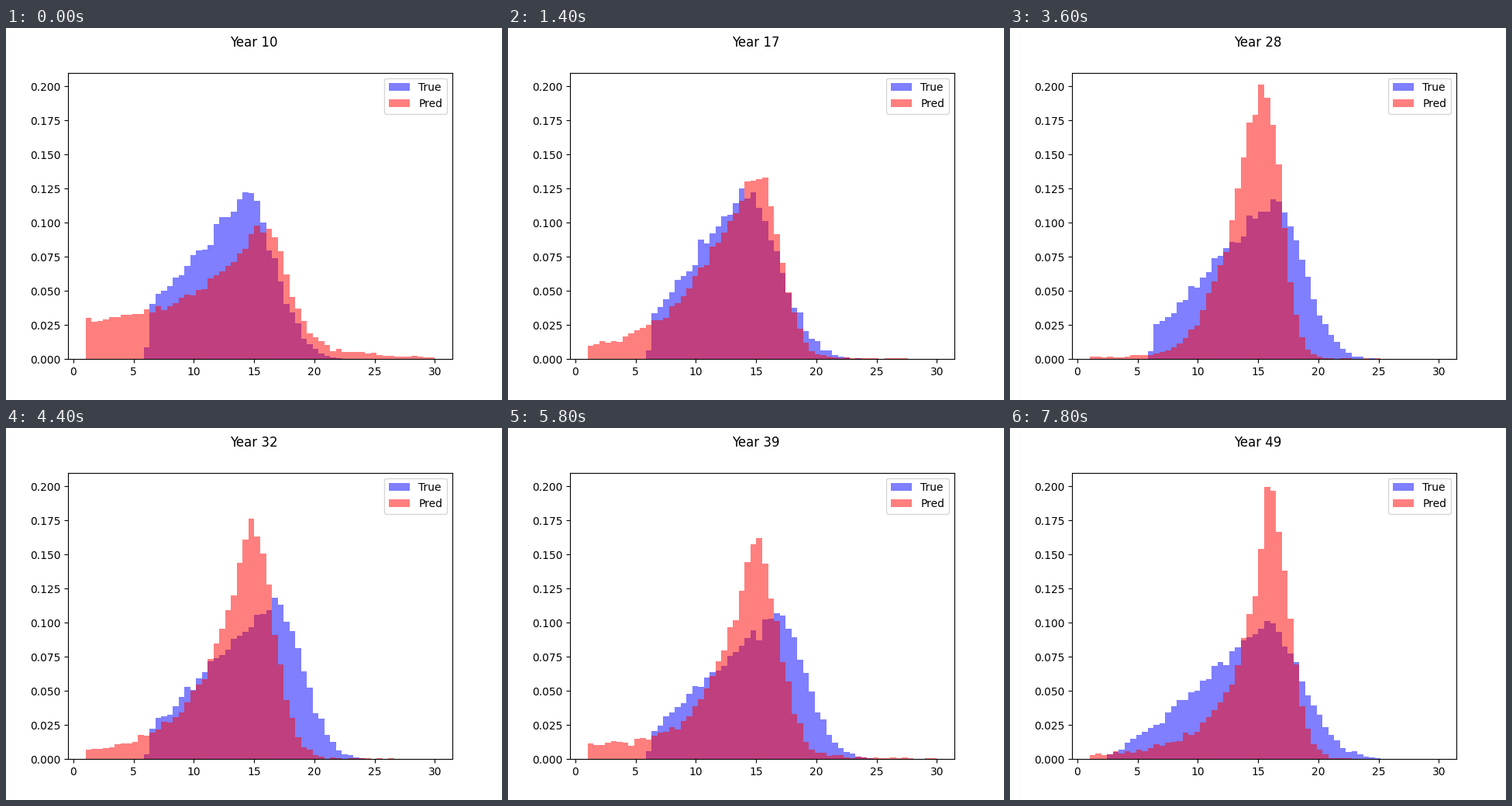
A matplotlib script that plays this animation: 640 px wide and 480 px high, repeating every 8000 ms.

```python
import matplotlib.pyplot as plt
import numpy as np
from matplotlib.animation import FuncAnimation

BINS = 60
EDGES = np.linspace(1, 30, BINS + 1)
X = (EDGES[:-1] + EDGES[1:]) / 2
FIRST_YEAR, LAST_YEAR = 10, 49
YEARS = [10, 17, 22, 28, 32, 39, 49]
RAMP_START = 6.5

# Shape parameters at the key years; densities are in thousandths.
TRUE = dict(
    foot=[5.95, 5.95, 5.95, 5.95, 5.95, 5.95, 2.2],
    start=[40, 31, 26, 22, 23, 20, 24],
    peak=[119, 124, 111, 117, 116, 108, 100],
    mode=[14.3, 13.9, 16.2, 16.2, 16.6, 16.6, 15.5],
    right=[2.4, 2.8, 2.1, 2.5, 2.3, 2.4, 3.0],
)
PRED = dict(
    floor=[26, 5, 7, 2, 4, 11, 1],
    peak=[103, 138, 155, 198, 174, 160, 209],
    mode=[15.7, 15.2, 14.7, 15.5, 14.8, 14.8, 15.7],
    left=[4.7, 5.6, 3.0, 3.5, 3.7, 3.1, 2.1],
    power=[1.05, 1.3, 1.0, 1.6, 1.1, 1.2, 0.8],
    right=[1.9, 1.7, 2.2, 1.4, 1.75, 1.85, 1.62],
)


def true_shape(foot, start, peak, mode, right):
    """Straight ramp up to the mode, half a bell after it."""
    ramp = np.interp(X, [foot, RAMP_START, mode], [0, start, peak])
    return ramp * np.exp(-0.5 * (np.maximum(X - mode, 0) / right) ** 2)


def pred_shape(floor, peak, mode, left, power, right):
    """Peak with a long left shoulder on a floor that fades to the right."""
    before = np.maximum(mode - X, 0)
    after = np.maximum(X - mode, 0)
    hill = np.exp(-(before / left) ** power - 0.5 * (after / right) ** 2)
    return (peak - floor) * hill + floor * np.exp(-after / 4.5)


def densities(shape, params, year, seed):
    now = {name: np.interp(year, YEARS, row) for name, row in params.items()}
    base = shape(**now)
    noise = np.random.default_rng(seed + year).normal(0, 0.35, BINS)
    return np.clip(base + noise * np.sqrt(base), 0, 209) / 1000


def draw_bars(color, label):
    return ax.bar(EDGES[:-1], np.zeros(BINS), np.diff(EDGES), align="edge",
                  color=color, alpha=0.5, label=label)


fig, ax = plt.subplots(figsize=(6.4, 4.8), dpi=100)
title = fig.suptitle("")
series = [
    (draw_bars("blue", "True"), true_shape, TRUE, 100),
    (draw_bars("red", "Pred"), pred_shape, PRED, 500),
]
ax.set_xlim(-0.45, 31.45)
ax.set_ylim(0, 0.21)
ax.legend(loc="upper right")


def update(frame):
    year = FIRST_YEAR + frame
    title.set_text(f"Year {year}")
    for bars, shape, params, seed in series:
        for bar, height in zip(bars, densities(shape, params, year, seed)):
            bar.set_height(height)
    return [title]


anim = FuncAnimation(fig, update, frames=LAST_YEAR - FIRST_YEAR + 1,
                     interval=200, repeat=True, repeat_delay=0)
plt.show()
```
